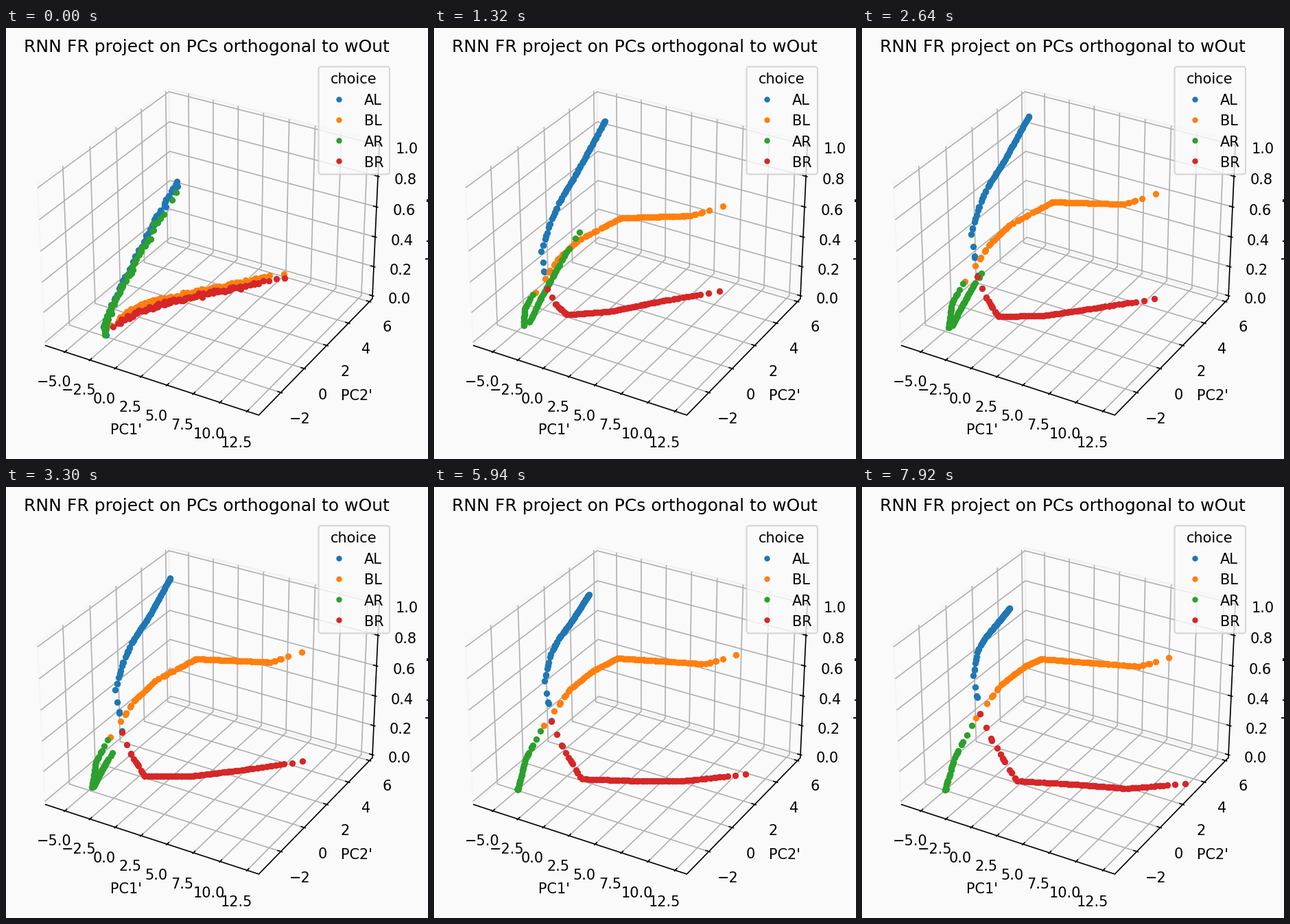
Recreate the animation shown at these times as a matplotlib script. Size 615 by 629 pixels, loop 8000 ms.

```python
import numpy as np
import matplotlib.pyplot as plt
from matplotlib.animation import FuncAnimation
from matplotlib.collections import LineCollection
from matplotlib.patches import FancyBboxPatch

W, H, DPI = 615, 629, 150
BG = "#fafafa"
LOOP, INTERVAL, HOLD = 8000, 40, 330
COLORS = {"AL": "#1f77b4", "BL": "#ff7f0e", "AR": "#2ca02c", "BR": "#d62728"}

plt.rcParams["font.family"] = "DejaVu Sans"
fig = plt.figure(figsize=((W + .01) / DPI, (H + .01) / DPI), dpi=DPI, facecolor=BG)
ax = fig.add_axes([0, 0, 1, 1])
ax.set_xlim(0, W)
ax.set_ylim(H, 0)
ax.axis("off")

# --- perspective box (elevation 30, azimuth -60) ---------------------------
BOX = np.array([8, 8, 6]) / 7 * 25 / 24
LOW = np.array([-7.0, -3.82, -1 / 48])
HIGH = np.array([13.57, 6.27, 49 / 48])
ELEV, AZIM = np.radians(30), np.radians(-60)
EYE = np.array([np.cos(ELEV) * np.cos(AZIM), np.cos(ELEV) * np.sin(AZIM), np.sin(ELEV)])
RIGHT = np.array([-np.sin(AZIM), np.cos(AZIM), 0])
UP = np.cross(EYE, RIGHT)
SCALE, CENTER = 2997, (299.8, 315.2)


def project(fx, fy, fz):
    """Pixel position of a point given as fractions of the box."""
    p = (np.array([fx, fy, fz]) - .5) * BOX
    k = SCALE / (10 - EYE @ p)
    return CENTER[0] + k * (RIGHT @ p), CENTER[1] - k * (UP @ p)


def path(*points):
    return [project(*p) for p in points]


def strokes(lines, color, width, z):
    ax.add_collection(LineCollection(lines, colors=color, linewidths=width, zorder=z))


def label(x, y, text, size=10, ha="center", z=3):
    ax.text(x, y, text, size=size, ha=ha, va="baseline", zorder=z)


ticks = [np.arange(-5, 12.6, 2.5), np.arange(-2, 7, 2), np.arange(6) / 5]
fx, fy, fz = [(v - LOW[i]) / (HIGH[i] - LOW[i]) for i, v in enumerate(ticks)]

strokes([path((0, 0, 0), (0, 1, 0), (0, 1, 1), (0, 0, 1), (0, 0, 0))], "#f6f6f6", 1, 0)
strokes([path((0, 1, 0), (1, 1, 0), (1, 1, 1), (0, 1, 1), (0, 1, 0))], "#f0f0f0", 1, 0)
strokes([path((0, 0, 0), (1, 0, 0), (1, 1, 0), (0, 1, 0), (0, 0, 0))], "#f3f3f3", 1, 0)

grid = [path((f, 0, 0), (f, 1, 0), (f, 1, 1)) for f in fx]
grid += [path((1, f, 0), (0, f, 0), (0, f, 1)) for f in fy]
grid += [path((0, 0, f), (0, 1, f), (1, 1, f)) for f in fz]
strokes(grid, "#b0b0b0", .8, 1)

IN, OUT, AWAY = 1 / 62, 1 / 125, .085
edges = [path((0, 0, 0), (1, 0, 0), (1, 1, 0), (1, 1, 1))]
edges += [path((f, IN, 0), (f, -OUT, 0)) for f in fx]
edges += [path((1 - IN, f, 0), (1 + OUT, f, 0)) for f in fy]
edges += [path((1 - IN, 1, f), (1 + OUT, 1, f)) for f in fz]
strokes(edges, "black", .8, 2)

spots = [path(*[(f, -AWAY, -AWAY) for f in fx]),
         path(*[(1 + AWAY, f, -AWAY) for f in fy]),
         path(*[(1 + AWAY, 1 + AWAY, f) for f in fz])]
for values, places, digits in zip(ticks, spots, (1, 0, 1)):
    for v, (x, y) in zip(values, places):
        label(x, y + 17, f"{v:.{digits}f}".replace("-", "\u2212"))

label(175, 593, "PC1'")
label(511.3, 542.5, "PC2'")
label(292.6, 34.5, "RNN FR project on PCs orthogonal to wOut", 12)

# visible rim of the cut-off z label
strokes([[(611, 337), (616, 337)], [(612.5, 311), (615, 311)], [(613.5, 250), (613.5, 254)]],
        "black", .9, 3)

# --- legend ----------------------------------------------------------------
ax.add_patch(FancyBboxPatch((455.5, 56.5), 103.5, 157, boxstyle="round,pad=0,rounding_size=4.2",
                            fc=BG, ec="#cccccc", lw=1, alpha=.8, zorder=5))
label(506.4, 81, "choice", z=6)
for i, (name, color) in enumerate(COLORS.items()):
    y = 112.2 + 30.2 * i
    ax.plot([485.2], [y - 8.4], ".", color=color, zorder=6)
    label(522, y, name, ha="left", z=6)

# --- motion of the curves, counted in steps --------------------------------
rng = np.random.default_rng(4)


def basis(t):
    """Fast settling followed by a steady drift."""
    return np.array([1, np.exp(-t / 2.5), t])


BLEND = np.linalg.inv([basis(t) for t in (0, 6, 24)])


def settle(start, early, late):
    poses = np.array([start, early, late], float)
    return lambda t: np.tensordot(basis(t) @ BLEND, poses, 1)


def collapse(start, corner, steps):
    start, corner = np.array(start, float), np.array(corner)
    return lambda t: start + (corner - start) * min(1, t / steps)


class Series:
    """Dots along a moving line, thinner at its first end or at both ends."""

    def __init__(self, motion, name, count, both=True, skew=1):
        self.motion = motion
        lengths = sum(np.hypot(*np.diff(motion(t), axis=0).T) for t in (0, 6, 24))
        self.arc = np.append(0, np.cumsum(lengths)) / lengths.sum()
        q = (np.arange(count) + 1.6 * rng.random(count)) / (count + .6)
        q = (q - q.min()) / (q.max() - q.min())
        self.u = np.arccos(1 - 2 * q ** skew) / np.pi if both else np.arccos(1 - q) * 2 / np.pi
        self.noise = rng.normal(0, 1.3, (2, count))
        self.dots, = ax.plot([], [], ".", ms=7, color=COLORS[name], zorder=4)

    def show(self, t):
        x, y = self.motion(t).T
        nx, ny = self.noise * np.exp(-t / 1.2)
        self.dots.set_data(np.interp(self.u, self.arc, x) + nx,
                           np.interp(self.u, self.arc, y) + ny)


al = settle([(250, 225), (205, 303), (170, 372), (157, 395), (147, 425), (144, 447)],
            [(246, 129), (209, 197), (182, 241), (169, 272), (158, 310), (167, 368)],
            [(215, 177), (199, 197), (180, 219), (169, 238), (162, 275), (172, 331)])
bl = settle([(154, 436), (176, 415), (203, 402), (228, 396), (357, 367), (406, 357)],
            [(149, 376), (183, 324), (213, 295), (277, 261), (379, 262), (425, 247)],
            [(166, 337), (204, 287), (237, 262), (261, 251), (404, 262), (447, 249)])
br = settle([(156, 437), (167, 429), (196, 413), (250, 397), (318, 383), (407, 363)],
            [(167, 370), (179, 397), (196, 420), (262, 417), (330, 405), (421, 390)],
            [(172, 331), (188, 367), (225, 429), (309, 434), (385, 440), (471, 433)])
ar_fall = collapse([(250, 238), (220, 285), (170, 375), (147, 424)], (121.5, 441), 13.5)
ar_rise = settle([(143, 447), (144, 438), (147, 424)],
                 [(145, 379), (131, 405), (128, 436)],
                 [(160, 348), (135, 395), (121, 442)])

series = [Series(al, "AL", 72, skew=2), Series(bl, "BL", 105),
          Series(ar_fall, "AR", 50, both=False), Series(ar_rise, "AR", 30, both=False),
          Series(br, "BR", 100)]


def update(i):
    step = (i * INTERVAL + INTERVAL // 2) // HOLD
    for s in series:
        s.show(step)
    return [s.dots for s in series]


anim = FuncAnimation(fig, update, frames=LOOP // INTERVAL, interval=INTERVAL,
                     repeat=True, repeat_delay=0, blit=False)
plt.show()
```
